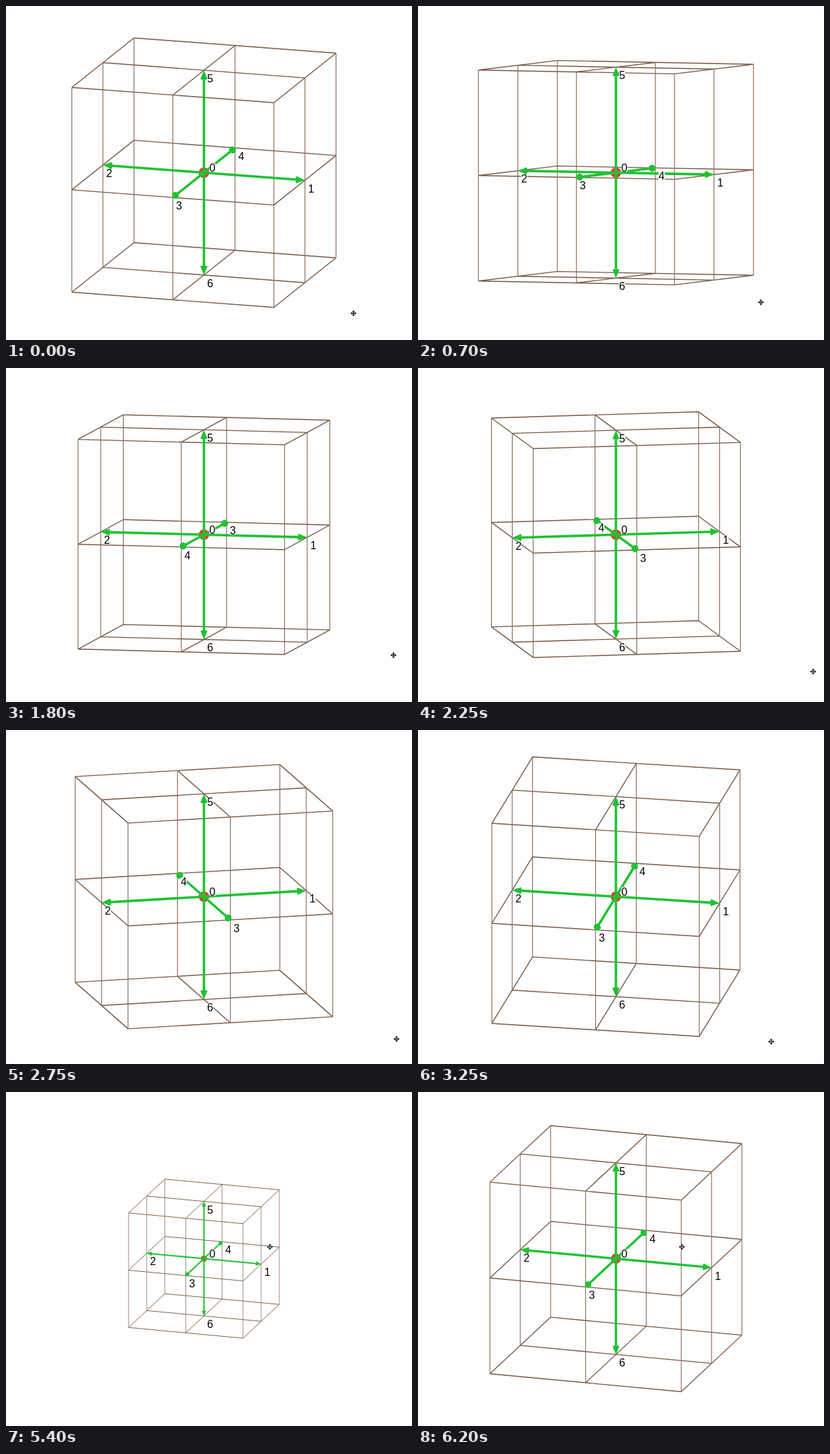
An HTML page for the animation above (6.25 s loop, 600x494 px).

```html
<!DOCTYPE html>
<html lang="en">
<head>
<meta charset="utf-8">
<title>Cube with six directions</title>
<style>
  html, body { margin: 0; width: 100%; height: 100%; overflow: hidden; background: #fefefe; }
  svg { display: block; width: 600px; height: 494px; }
  path { fill: none; }
  #edges { stroke: #775843; }
  #uprights { stroke: #8a7060; }
  #shafts { stroke: #1fc234; }
  #heads { fill: #1fc234; stroke: none; }
  #ball { fill: #f0372d; }
  text { font: 16px "Liberation Sans", Arial, sans-serif; fill: #000; }
  rect { fill: #fefefe; }
  #cursor .halo { stroke: #fff; stroke-width: 3; }
  #cursor .cross { stroke: #111; stroke-width: 1.2; }
  #cursor .tips { fill: #111; }
</style>
</head>
<body>
<svg viewBox="0 0 600 494">
  <path id="edges"/>
  <path id="uprights"/>
  <circle id="ball" cx="292.5" cy="246.5"/>
  <path id="shafts"/>
  <path id="heads"/>
  <g id="labels"></g>
  <g id="cursor">
    <path class="halo" d="M-4 0H4M0-4V4"/>
    <path class="cross" d="M-3.5 0H3.5M0-3.5V3.5"/>
    <path class="tips" d="M0-4.5L2-2H-2ZM0 4.5L2 2H-2ZM-4.5 0L-2-2V2ZM4.5 0L2-2V2Z"/>
  </g>
</svg>
<script>
const LOOP = 6250, STEP = 50, CX = 292.5, CY = 246.5, FULL = 156.2;
const $ = id => document.getElementById(id);

// time, yaw, pitch, half size, cursor x, cursor y
const keys = [
  [0, 17.1, 14.2, FULL, 513.5, 454.5],
  [650, 22, 4, FULL, 506, 440],
  [1300, 17.3, -15.9, FULL, 549, 411.5],
  [1400, 17.3, -15.9, FULL, 549, 411.5],
  [1950, -19, -2, FULL, 580, 432],
  [2250, -11.4, 8.5, FULL, 584, 449],
  [2650, -16, 12, FULL, 582, 456],
  [3250, 11.1, 18.7, FULL, 522, 461],
  [3350, 14, 18.9, FULL, 521, 462],
  [3700, 19, 18.2, FULL, 514, 460],
  [4000, 17.6, 17.2, FULL, 470, 380],
  [4300, 17.6, 17.2, FULL, 390, 229],
  [4450, 17.6, 17.2, FULL, 390, 229],
  [4750, 17.6, 17.2, 118, 390, 229],
  [5150, 17.6, 17.2, 82, 390, 229],
  [5400, 17.6, 17.2, 88.7, 390, 229],
  [6050, 17.6, 17.2, 148.3, 390, 229],
  [6250, 17.6, 17.2, 148.3, 390, 229]
];

const slope = (i, c) => (keys[i + 1][c] - keys[i][c]) / (keys[i + 1][0] - keys[i][0]);

// Monotone tangent: flat at turning points
function tangent(i, c) {
  if (i === 0 || i === keys.length - 1) return 0;
  const a = slope(i - 1, c), b = slope(i, c);
  return a * b <= 0 ? 0 : 2 * a * b / (a + b);
}

function sample(t, c) {
  let i = 0;
  while (i < keys.length - 2 && t >= keys[i + 1][0]) i++;
  const p = keys[i], q = keys[i + 1], h = q[0] - p[0];
  const u = (t - p[0]) / h, v = 1 - u;
  return p[c] * (1 + 2 * u) * v * v + q[c] * u * u * (3 - 2 * u)
    + h * u * v * (v * tangent(i, c) - u * tangent(i + 1, c));
}

const axes = [[1, 0, 0], [-1, 0, 0], [0, 0, 1], [0, 0, -1], [0, 1, 0], [0, -1, 0]];

const labels = [0, 1, 2, 3, 4, 5, 6].map(n => {
  const make = (tag, attrs) => {
    const el = document.createElementNS("http://www.w3.org/2000/svg", tag);
    for (const k in attrs) el.setAttribute(k, attrs[k]);
    return el;
  };
  const g = make("g", {});
  const text = make("text", {});
  text.textContent = n;
  g.append(make("rect", { x: 0, y: -12, width: 9, height: 12.5 }), text);
  $("labels").append(g);
  return g;
});

const move = (el, x, y) => el.setAttribute("transform", `translate(${x.toFixed(2)} ${y.toFixed(2)})`);
const pt = p => p[0].toFixed(2) + " " + p[1].toFixed(2);

function draw(t) {
  const [yaw, pitch, size, mx, my] = [1, 2, 3, 4, 5].map(c => sample(t, c));
  const a = yaw * Math.PI / 180, p = pitch * Math.PI / 180, k = size / FULL;
  const ca = Math.cos(a), sa = Math.sin(a), cp = Math.cos(p), sp = Math.sin(p);
  const project = ([x, y, z]) => [
    CX + size * (x * ca - z * sa),
    CY + size * ((x * sa + z * ca) * sp - y * cp)
  ];

  // Eight parallel lines along each axis
  const lines = ["", "", ""];
  for (let axis = 0; axis < 3; axis++)
    for (let u = -1; u <= 1; u++)
      for (let v = -1; v <= 1; v++) {
        if (!u && !v) continue;
        const from = [u, v], to = [u, v];
        from.splice(axis, 0, -1);
        to.splice(axis, 0, 1);
        lines[axis] += `M${pt(project(from))}L${pt(project(to))}`;
      }
  $("edges").setAttribute("d", lines[0] + lines[2]);
  $("uprights").setAttribute("d", lines[1]);
  $("edges").setAttribute("stroke-width", 0.3 + 1.1 * k);
  $("uprights").setAttribute("stroke-width", 0.3 + 0.9 * k);

  let shafts = "", heads = "";
  axes.forEach((axis, i) => {
    const tip = project(axis), base = project(axis.map(c => c * 0.917));
    const dx = tip[0] - CX, dy = tip[1] - CY, len = Math.hypot(dx, dy);
    const ux = dx / len, uy = dy / len, r = 5.2 * k;
    const flat = r * Math.sqrt(Math.max(0, 1 - (len / size) ** 2));
    const turn = Math.atan2(uy, ux) * 180 / Math.PI;
    const l = [base[0] - uy * r, base[1] + ux * r];
    const m = [base[0] + uy * r, base[1] - ux * r];
    shafts += `M${CX} ${CY}L${pt(base)}`;
    heads += `M${pt(l)}A${flat} ${r} ${turn} 1 1 ${pt(m)}A${flat} ${r} ${turn} 1 1 ${pt(l)}Z`
      + `M${pt(l)}L${pt(m)}L${pt(tip)}Z`;
    move(labels[i + 1], tip[0] + 4.8, tip[1] + 17.8);
  });
  $("shafts").setAttribute("d", shafts);
  $("shafts").setAttribute("stroke-width", 3.6 * k);
  $("heads").setAttribute("d", heads);
  $("ball").setAttribute("r", 7.8 * k);
  move(labels[0], CX + 8, CY - 2);
  move($("cursor"), mx, my);
}

const start = performance.now();
function frame() {
  const t = (performance.now() - start) % LOOP;
  draw(Math.floor(t / STEP) * STEP);
  requestAnimationFrame(frame);
}
frame();
</script>
</body>
</html>
```
